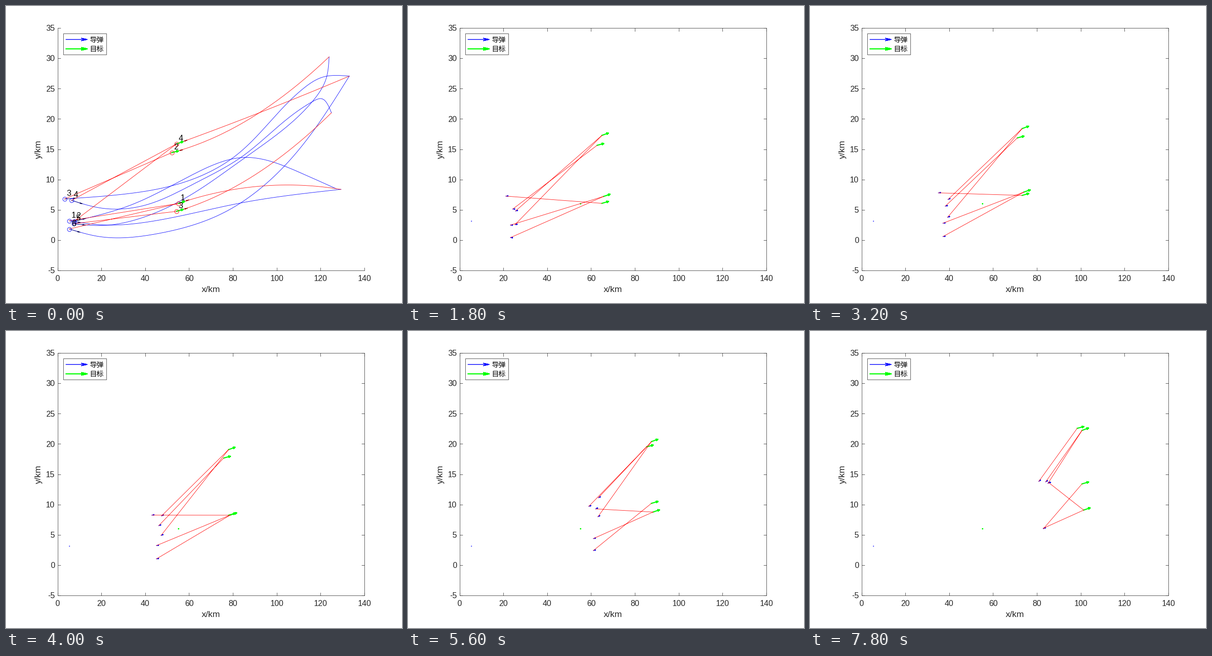
Recreate the animation shown at these times as a matplotlib script. Size 864 by 648 pixels, loop 8 s.

```python
import numpy as np
import matplotlib.pyplot as plt
from matplotlib.animation import FuncAnimation
from matplotlib.patches import Rectangle

W, H = 864, 648
STEP = 200
FRAMES = 40
LEFT, RIGHT, TOP, BOTTOM = 112.5, 782, 48, 577
BLUE, RED, GREEN, INK = "#0000ff", "#ff0000", "#00ff00", "#262626"

plt.rcParams["font.family"] = ["Liberation Sans", "Noto Sans CJK JP"]


def spline(pts, n=800):
    """Natural cubic spline through key points, by chord length."""
    p = np.array(pts, float)
    h = np.hypot(*np.diff(p, axis=0).T)
    u = np.r_[0, np.cumsum(h)]
    a, b = np.eye(len(u)), np.zeros_like(p)
    for i in range(1, len(u) - 1):
        a[i, i - 1:i + 2] = h[i - 1], 2 * (h[i - 1] + h[i]), h[i]
        b[i] = 6 * ((p[i + 1] - p[i]) / h[i] - (p[i] - p[i - 1]) / h[i - 1])
    m = np.linalg.solve(a, b)
    t = np.linspace(0, u[-1], n)
    i = np.clip(np.searchsorted(u, t) - 1, 0, len(u) - 2)
    w = h[i][:, None]
    s = (t - u[i])[:, None] / w
    r = 1 - s
    return (r * p[i] + s * p[i + 1]
            + w * w / 6 * ((r**3 - r) * m[i] + (s**3 - s) * m[i + 1])).T


class Missile:
    """Follows a curve at constant horizontal speed and points along it."""
    SPEED = 47.6

    def __init__(self, *keys):
        self.path = spline(keys)

    def pos(self, t):
        x = self.path[0][0] + self.SPEED * t
        return np.array([x, np.interp(x, *self.path)])

    def heading(self, t):
        d = self.pos(t + 0.1) - self.pos(t)
        return d / np.hypot(*d)


class Target:
    """Flies a parabola; its arrow keeps the first heading."""
    SPEED = 28.4

    def __init__(self, x, y, slope, bend, end):
        self.x, self.y, self.slope, self.bend = x, y, slope, bend
        xs = np.linspace(x, end, 200)
        self.path = xs, self.height(xs)

    def height(self, x):
        d = x - self.x
        return self.y + self.slope * d + self.bend * d * d

    def pos(self, t):
        x = self.x + self.SPEED * t
        return np.array([x, self.height(x)])

    def heading(self, t):
        return np.array([1, self.slope]) / np.hypot(1, self.slope)


missiles = [
    Missile((138, 468.5), (200, 477), (329, 468), (511, 430), (731, 400)),
    Missile((149, 469.5), (273, 434), (414, 364.5), (518, 330.5), (645, 365),
            (721, 399)),
    Missile((128, 421), (253, 411), (396, 382), (500, 327.5), (650, 179),
            (690, 155.5), (749, 153)),
    Missile((143, 424), (205, 440.5), (300, 435.5), (409, 388.5), (513, 330),
            (668, 209), (687, 202), (710, 233)),
    Missile((148, 475), (205, 479), (300, 461), (414, 405.5), (517, 334),
            (668, 209), (698, 160), (705, 111)),
    Missile((138, 486.5), (200, 502.5), (329, 497), (472, 452.5), (625, 330),
            (749, 153)),
]
targets = [
    Target(375.5, 431, -0.339, 0.00071, 731),
    Target(361.5, 320, -0.263, -0.001007, 705),
    Target(372, 448, -0.289, -0.001027, 710),
    Target(372, 301, -0.362, -0.000081, 749),
]

# Target number chased by each missile, from the given second on.
PLANS = [(0, (1, 4, 2, 4, 3, 1)),
         (0.2, (1, 4, 3, 2, 4, 1)),
         (4.8, (1, 4, 2, 1, 4, 3)),
         (6.4, (1, 1, 2, 4, 4, 3))]


def plan_at(t):
    return [p for start, p in PLANS if t >= start - 1e-6][-1]


def join(parts):
    """Polylines as one array, with gaps between them."""
    gap = [[np.nan, np.nan]]
    return np.vstack([np.vstack([p, gap]) for p in parts]).T


def arrow(tail, way, length, back, half):
    tail, way = np.array(tail, float), np.array(way, float)
    tip = tail + way * length
    base = tip - way * back
    side = np.array([-way[1], way[0]]) * half
    return np.array([tail, tip, base + side, tip, base - side, tip])


def arrows(group, t, *size):
    return join([arrow(k.pos(t), k.heading(t), *size) for k in group])


def sight_lines(t):
    return join([[m.pos(t), targets[k - 1].pos(t)]
                 for m, k in zip(missiles, plan_at(t))])


fig = plt.figure(figsize=(W / 72, H / 72), dpi=72, facecolor="white")
ax = fig.add_axes([0, 0, 1, 1])
ax.set(xlim=(0, W), ylim=(H, 0))
ax.axis("off")


def line(xy, color, lw=0.85, z=2, **kw):
    return ax.plot(*xy, color=color, lw=lw, zorder=z,
                   solid_joinstyle="miter", **kw)[0]


def text(x, y, s, size=17.5, color=INK, ha="center", z=6):
    return ax.text(x, y + 0.36 * size, s, size=size, color=color, ha=ha,
                   va="baseline", zorder=z)


# Axes; the closed box is shown only after the overview.
xt = np.linspace(LEFT, RIGHT, 8)
yt = np.linspace(BOTTOM, TOP, 9)
TICK = 6.5


def ticks(x_edge, y_edge, dx, dy):
    return join([[(x, y_edge), (x, y_edge + dy)] for x in xt]
                + [[(x_edge, y), (x_edge + dx, y)] for y in yt])


line(([LEFT, LEFT, RIGHT], [TOP, BOTTOM, BOTTOM]), INK, 0.8, 1)
line(ticks(LEFT, BOTTOM, TICK, -TICK), INK, 0.8, 1)
box = [line(([LEFT, RIGHT, RIGHT], [TOP, TOP, BOTTOM]), INK, 0.8, 1),
       line(ticks(RIGHT, TOP, -TICK, TICK), INK, 0.8, 1)]
for i, x in enumerate(xt):
    text(x, 594, str(20 * i))
for i, y in enumerate(yt):
    text(106.5, y, str(5 * i - 5), ha="right")
for x, y, name, turn in ((447, 619, "x/km", 0), (71, 312.5, "y/km", 90)):
    ax.text(x, y, name, size=19.3, color=INK, ha="center", va="center",
            rotation=turn)

# Legend
ax.add_patch(Rectangle((125, 60), 94, 46, fc="white", ec=INK, lw=0.8, zorder=5))
for y, color, lw, label in ((73, BLUE, 1.5, "导弹"), (93.5, GREEN, 2.4, "目标")):
    line(arrow((131, y), (1, 0), 46, 13, 2.8).T, color, lw, 6)
    text(182.5, y, label, 15.4, "black", "left")

# Overview: whole paths, start circles, numbers and headings
overview = []
for group, color in ((missiles, BLUE), (targets, RED)):
    for n, k in enumerate(group, 1):
        x, y = k.pos(0)
        overview += [
            line(k.path, color),
            line(([x], [y]), color, z=4, marker="o", ms=9, mfc="none", mew=0.9),
            text(x + 9.5, y - 13, str(n), 17.5, "black", z=4),
        ]
overview += [line(arrows(missiles, 0, 25, 6, 0.8), "#000060", 0.8, 3),
             line(arrows(targets, 0, 25, 6, 0.8), "#a00000", 0.8, 2)]

# Starting dots left behind once the chase runs
dots = [line(([138], [468.5]), BLUE, marker="o", ms=2, mew=0),
        line(([376.3], [430.5]), GREEN, marker="o", ms=3.2, mew=0)]

shots = line(([], []), BLUE, 1.5, 3)
prey = line(([], []), GREEN, 2.4, 3)
sights = line(([], []), RED, z=3.5)


def update(i):
    t = i * STEP / 1000
    start = i == 0
    for a in overview:
        a.set_visible(start)
    for a in box + dots + [shots]:
        a.set_visible(not start)
    sights.set_data(*sight_lines(t))
    shots.set_data(*arrows(missiles, t, 4.8, 2, 1))
    prey.set_data(*arrows(targets, t, 15, 4.5, 2))
    return []


anim = FuncAnimation(fig, update, frames=FRAMES, interval=STEP, repeat=True,
                     init_func=lambda: update(0))
plt.show()
```
